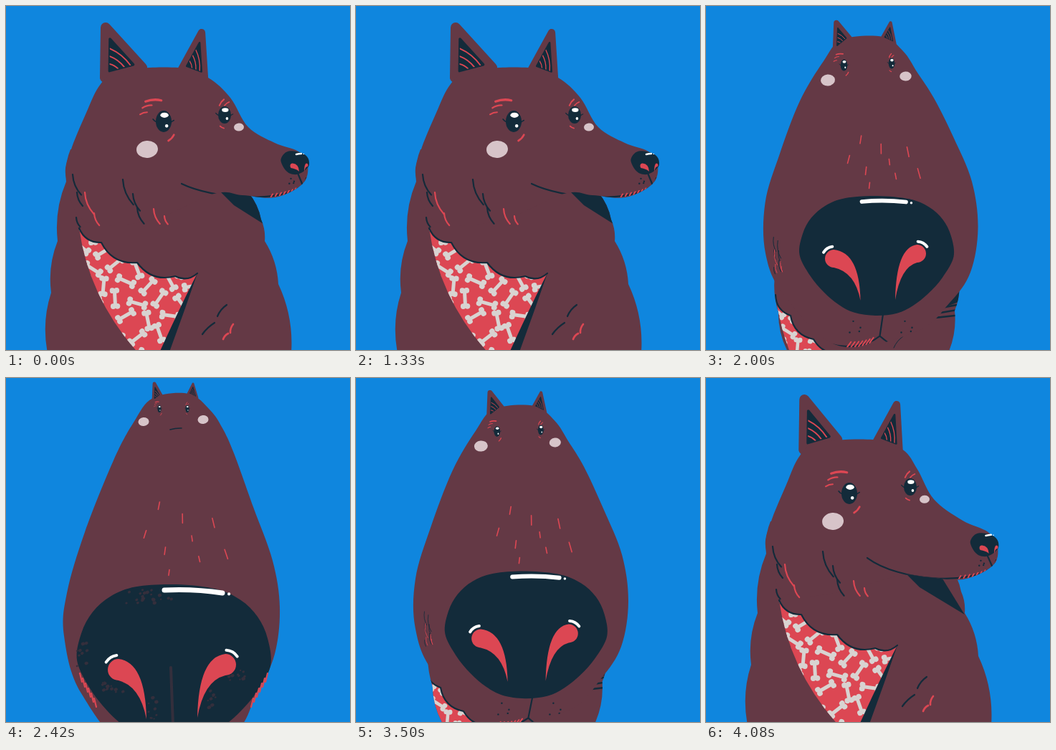
Recreate the animation shown at these times as an HTML page with a canvas. Size 480 by 480 pixels, loop 4160 ms.

```html
<!DOCTYPE html>
<html>
<head>
<meta charset="utf-8">
<style>
html, body { margin: 0; width: 100%; height: 100%; overflow: hidden; background: #0f86de; }
canvas { display: block; width: 480px; height: 480px; }
</style>
</head>
<body>
<canvas id="stage" width="480" height="480"></canvas>
<script>
const ctx = document.getElementById('stage').getContext('2d');
const BLUE = '#0f86de', FUR = '#643945', NAVY = '#132b3a', RED = '#dc4753',
  PINK = '#d7c4c9', BONE = '#d8d3d1', WHITE = '#fff', GRAIN = '#342f3c';
const LOOP = 4160, FRAMES = 50;

// Key points of a pose. Sizes: eyes x y rx ry, cheeks x y r, nose x y rx ry tilt,
// nostrils head tail r, shine line width, scarf bend tip scale,
// neck x y kx ky width, chest x y width, bridge x y rx ry length.
const SIDE = {
  head: [110,300, 84,240, 90,203, 112,149, 132,109, 160,90, 240,86, 282,100, 313,128,
    338,169, 375,191, 408,203, 421,222, 414,248, 376,267, 330,264, 290,262, 200,300],
  torso: [58,484, 63,400, 72,328, 84,245, 90,200, 338,260, 356,298, 361,328, 380,388, 398,484],
  ears: [[138,100, 139,30, 190,86], [245,88, 273,37, 277,100]],
  eyes: [[220,161,11,15], [305,152,9,12]],
  cheeks: [[197,200,15], [325,169,7]],
  nose: [403,219,20,16,.2],
  nostrils: [[400,223,409,231,3.5], [419,222,416,231,2.5]],
  shine: [405,207,412,206,2.5],
  mouth: [245,248, 290,270, 385,275, 414,250, 419,240],
  shadow: [298,258, 345,258, 378,316, 318,278],
  fur: [102,310, 133,330, 183,358, 236,377, 267,373],
  scarf: [116,410,188,488,1],
  neck: [90,235,1,1,2.2], chest: [308,417,2.2], bridge: [350,195,0,0,0], hair: 4
};
const TURN = {
  head: [80,290, 79,250, 92,205, 112,160, 146,98, 165,78, 240,73, 264,85, 283,115,
    299,149, 335,173, 360,212, 368,262, 355,312, 322,346, 262,368, 205,355, 147,307],
  torso: [70,484, 67,405, 73,340, 82,265, 93,205, 345,312, 377,350, 382,385, 380,405, 381,484],
  ears: [[152,92, 150,35, 184,74], [236,76, 254,34, 255,80]],
  eyes: [[178,137,10,13], [269,130,8,11]],
  cheeks: [[151,171,13], [286,153,8]],
  nose: [252,267,51,34,0],
  nostrils: [[227,271,250,294,8], [277,266,265,294,8]],
  shine: [240,242,263,240,4],
  mouth: [147,307, 170,345, 235,380, 261,347, 318,345],
  shadow: [240,368, 357,318, 386,388, 300,386],
  fur: [91,318, 120,350, 152,382, 190,404, 212,400],
  scarf: [104,410,150,490,.87],
  neck: [80,240,.5,1,2.2], chest: [286,435,2.2], bridge: [243,203,26,18,9], hair: 9
};
const CLOSE = {
  head: [85,330, 80,250, 95,200, 112,150, 150,92, 175,66, 238,64, 266,82, 288,116,
    318,152, 345,185, 370,235, 377,300, 363,358, 330,388, 275,410, 190,428, 112,365],
  torso: [80,484, 72,415, 76,345, 84,270, 95,200, 345,355, 371,366, 371,395, 364,430, 366,484],
  ears: [[155,90, 157,39, 184,66], [237,68, 254,39, 260,78]],
  eyes: [[171,122,7,11], [265,117,6,10]],
  cheeks: [[148,146,12.5], [282,138,9]],
  nose: [242,299,80,57,0],
  nostrils: [[200,298,235,346,10], [283,291,261,346,10]],
  shine: [214,250,256,247,4.5],
  mouth: [106,352, 122,420, 205,445, 253,391, 318,398],
  shadow: [200,428, 368,355, 374,405, 290,436],
  fur: [97,403, 118,432, 150,465, 190,484, 200,490],
  scarf: [103,450,120,490,.9],
  neck: [88,305,.12,.9,2], chest: [300,482,2], bridge: [240,207,50,22,14], hair: 9
};
const LENS = {
  ...CLOSE,
  head: [81,360, 85,300, 110,215, 150,115, 178,62, 205,28, 255,22, 285,45, 302,70,
    318,105, 345,180, 372,255, 382,320, 375,385, 350,440, 310,500, 180,520, 105,440],
  torso: [150,484, 130,440, 120,380, 120,300, 140,230, 300,300, 330,330, 335,370, 330,420, 310,484],
  ears: [[206,32, 207,8, 216,24], [254,22, 261,8, 267,28]],
  eyes: [[214,43,2.5,5], [253,43,2.5,5]],
  cheeks: [[192,61,7.5], [275,58,7.5]],
  nose: [234,398,135,110,.03],
  nostrils: [[157,407,196,476,15], [306,400,267,474,15]],
  shine: [221,296,302,300,7],
  mouth: [100,470, 140,520, 200,540, 232,530, 330,520],
  neck: [100,340,.05,.5,0], chest: [250,440,0], bridge: [243,220,68,58,13]
};

const clamp = v => Math.min(1, Math.max(0, v));
const smooth = v => (v = clamp(v), v * v * (3 - 2 * v));
const lerp = (a, b, u) => a + (b - a) * u;
const point = (a, b, u) => [lerp(a[0], b[0], u), lerp(a[1], b[1], u)];
const pairs = p => Array.from({ length: p.length >> 1 }, (_, i) => [p[2 * i], p[2 * i + 1]]);

// Turns the side pose: a moves the eyes, b the nose, h lowers the muzzle.
const TURNING = { head: 36, ears: 6, eyes: 2, cheeks: 2, nose: 2, nostrils: 4, shine: 4, mouth: 10, shadow: 8 };
function turned(a, b, h) {
  const move = (v, n) => {
    if (Array.isArray(v[0])) return v.map(w => move(w, n));
    const out = v.slice();
    for (let i = 0; i < n; i += 2) {
      const x = v[i], y = v[i + 1];
      out[i] += smooth((x - 110) / 90) * lerp(.35, 1, smooth((y - 95) / 45)) * lerp(a, b, smooth((x - 340) / 80));
      out[i + 1] += h * smooth((x - 230) / 50) * smooth((y - 165) / 50);
    }
    return out;
  };
  const pose = { ...SIDE };
  for (const key in TURNING) pose[key] = move(SIDE[key], TURNING[key]);
  return pose;
}
const AWAY = turned(24, 47, -8), BACK = turned(-20, -14, 14);

const KEYS = [[0, SIDE], [2, AWAY], [14, AWAY], [16, SIDE], [20, TURN], [22, CLOSE],
  [26, LENS], [40, LENS], [45, CLOSE], [49, BACK], [50, SIDE]];

function blend(a, b, u) {
  if (typeof a === 'number') return lerp(a, b, u);
  if (Array.isArray(a)) return a.map((v, i) => blend(v, b[i], u));
  return Object.fromEntries(Object.keys(a).map(k => [k, blend(a[k], b[k], u)]));
}

function fill(path, color) {
  ctx.fillStyle = color;
  ctx.fill(path);
}
function stroke(path, w, color) {
  if (w < .15) return;
  ctx.lineWidth = w;
  ctx.strokeStyle = color;
  ctx.stroke(path);
}
// A brush mark from a to b, bent sideways by a share of its length.
function mark(a, b, bend, w, color) {
  const path = new Path2D();
  path.moveTo(...a);
  path.quadraticCurveTo((a[0] + b[0]) / 2 + (b[1] - a[1]) * bend, (a[1] + b[1]) / 2 - (b[0] - a[0]) * bend, ...b);
  stroke(path, w, color);
}
function oval(x, y, rx, ry, color, rot = 0) {
  const path = new Path2D();
  path.ellipse(x, y, rx, ry, rot, 0, 7);
  fill(path, color);
}
function clipped(path, paint) {
  ctx.save();
  ctx.clip(path);
  paint();
  ctx.restore();
}

function rounded(flat) {
  const p = pairs(flat), n = p.length, path = new Path2D();
  path.moveTo(...p[0]);
  for (let i = 0; i < n; i++) {
    const [a, b, c, d] = [i + n - 1, i, i + 1, i + 2].map(k => p[k % n]);
    path.bezierCurveTo(b[0] + (c[0] - a[0]) / 6, b[1] + (c[1] - a[1]) / 6,
      c[0] - (d[0] - b[0]) / 6, c[1] - (d[1] - b[1]) / 6, ...c);
  }
  return path;
}
// Tufts of fur: an arc between each two points.
function tufted(flat, bulge) {
  const p = pairs(flat), path = new Path2D();
  path.moveTo(...p[0]);
  for (let i = 1; i < p.length; i++) {
    const [a, b] = [p[i - 1], p[i]];
    path.quadraticCurveTo((a[0] + b[0]) / 2 + (b[1] - a[1]) * bulge, (a[1] + b[1]) / 2 - (b[0] - a[0]) * bulge, ...b);
  }
  return path;
}
function polygon(points) {
  const path = new Path2D();
  points.forEach(p => path.lineTo(...p));
  path.closePath();
  return path;
}

function drawBone(x, y, rot) {
  ctx.save();
  ctx.translate(x, y);
  ctx.rotate(rot);
  mark([-9, 0], [9, 0], 0, 5, BONE);
  for (const sx of [-11, 11]) for (const sy of [-3, 3]) oval(sx, sy, 3.9, 3.7, BONE);
  ctx.restore();
}

function drawScarf({ fur, scarf }) {
  const [bx, by, tx, ty, k] = scarf, [x0, y0] = fur, [x1, y1] = fur.slice(-2);
  const edge = tufted(fur, -.34), cloth = new Path2D(edge);
  cloth.lineTo(tx + 27, ty);
  cloth.lineTo(tx, ty);
  cloth.quadraticCurveTo(bx, by, x0, y0);
  fill(cloth, RED);
  clipped(cloth, () => {
    ctx.translate(x0, y0);
    ctx.scale(k, k);
    for (let row = 0; row < 8; row++)
      for (let col = 0; col < 7; col++)
        drawBone(col * 31 + row % 2 * 15 - 12, row * 24 + col % 2 * 7 + 2, col * 1.9 + row * 1.1 - .4);
  });
  const shade = new Path2D();
  shade.moveTo(x1, y1);
  shade.quadraticCurveTo(lerp(x1, tx, .3), lerp(y1, ty, .4), tx + 24, ty);
  shade.lineTo(tx + 38, ty);
  shade.quadraticCurveTo(lerp(x1, tx, .25), lerp(y1, ty, .5), x1, y1);
  fill(shade, NAVY);
  stroke(edge, 2.2, NAVY);
}

function drawChest({ shadow, chest, hair }) {
  const [a, b, c, d] = pairs(shadow);
  fill(polygon([a, b, c, d]), NAVY);
  for (let i = 1; i < 4; i++)
    mark(point(a, d, .3 * i), [c[0] - 9 * i, c[1] + 9 * i], -.05, (hair - 4) / 2, NAVY);
  const [x, y, w] = chest;
  mark([x, y], [x - 13, y + 16], -.15, w, NAVY);
  mark([x - 17, y + 25], [x - 34, y + 41], -.1, w, NAVY);
  mark([x + 9, y + 27], [x + 5, y + 39], -.2, w * 1.2, RED);
  mark([x + 2, y + 40], [x - 5, y + 48], -.2, w * 1.2, RED);
}

const NECK = [[3, 0, 30], [9, 25, 20], [73, 7, 37], [87, 27, 25], [93, 46, 24], [8, 60, 14],
  [20, 25, 32, RED], [33, 54, 18, RED], [116, 48, 22, RED], [131, 58, 12, RED]];
function drawNeck({ neck: [x, y, kx, ky, w] }) {
  for (const [dx, dy, len, color = NAVY] of NECK) {
    const a = [x + dx * kx, y + dy * ky];
    mark(a, [a[0] + len * .4 * Math.sqrt(kx), a[1] + len * ky * .95], -.18, w, color);
  }
}

const earSize = p => Math.abs(p[1] - p[3]) * .2;
function drawEar(p) {
  const path = polygon(pairs(p));
  fill(path, FUR);
  stroke(path, earSize(p), FUR);
}
function drawInnerEar(p) {
  const pts = pairs(p), mid = [(p[0] + p[2] + p[4]) / 3, (p[1] + p[3] + p[5]) / 3 + earSize(p) * .15];
  const [left, tip, right] = pts.map(q => point(mid, q, .64));
  const path = polygon([left, tip, right]);
  fill(path, NAVY);
  stroke(path, earSize(p) * .25, NAVY);
  clipped(path, () => {
    for (let i = 0; i < 3; i++)
      mark(point(tip, left, .3 + .24 * i), point(right, left, .12 + .26 * i), .14, earSize(p) * .13, RED);
  });
}

function drawEye([x, y, rx, ry], i) {
  const at = (u, v) => [x + u * rx, y + v * ry];
  const tick = (a, b, c, d, w, color, bend = .15) => mark(at(a, b), at(c, d), bend, ry * w, color);
  oval(x, y, rx, ry, NAVY);
  tick(-.8, .1, -1.35, -.2, .12, NAVY);
  tick(.8, .2, 1.3, -.1, .1, NAVY);
  oval(...at(.1, -.58), rx * .52, ry * .24, WHITE);
  oval(...at(.38, .42), rx * .2, ry * .16, WHITE);
  if (i) {
    tick(-.8, -1.1, -.1, -1.8, .17, RED);
    tick(0, -1.1, .7, -1.5, .15, RED);
    tick(-.7, 1.3, -.1, 1.55, .15, RED, -.15);
  } else {
    tick(-2.3, -1.85, -.3, -1.95, .22, RED);
    tick(-2.7, -1.25, -1.5, -1.5, .15, RED);
    tick(-3, -.65, -2.1, -.85, .14, RED);
    tick(.6, 1.8, 1.3, 1.25, .18, RED, -.15);
  }
}

function drawMouth({ mouth, nose, hair }) {
  const [a, b, c, m, r] = pairs(mouth);
  const bend = [(m[0] + r[0]) / 2, Math.max(m[1], r[1]) + .45 * Math.abs(r[0] - m[0])];
  const path = new Path2D();
  path.moveTo(...a);
  path.bezierCurveTo(...b, ...c, ...m);
  path.quadraticCurveTo(...bend, ...r);
  path.moveTo(nose[0] + hair, nose[1] + nose[3] - 2);
  path.lineTo(...m);
  stroke(path, 2.2, NAVY);

  const quad = (p, q, s, u) => point(point(p, q, u), point(q, s, u), u);
  const left = u => point(quad(a, b, c, u), quad(b, c, m, u), u);
  const right = u => quad(m, bend, r, u);
  const bristle = ([x, y], lean) => mark([x, y + 1], [x + lean * hair, y - hair * .7], 0, 1.9, RED);
  for (let i = 0; i < 7; i++) {
    bristle(left(.68 + .035 * i), .6);
    bristle(right(.3 + .1 * i), .5);
  }
  for (const side of [-1, 1])
    for (let i = 0; i < 4; i++)
      oval(m[0] + side * hair * 4 + hair * Math.cos(i * 2.3), m[1] - hair * 1.3 + hair * Math.sin(i * 2.3), 1.2, 1.2, NAVY);
}

// Ticks spread evenly over the bridge of the muzzle.
function drawBridge({ bridge: [x, y, rx, ry, len] }) {
  for (let i = 0; i < 9; i++) {
    const r = Math.sqrt((i + .5) / 9), px = x + rx * r * Math.cos(i * 2.4), py = y + ry * r * Math.sin(i * 2.4);
    mark([px, py], [px + (px - x) * .07, py + len * (.6 + i % 3 * .2)], 0, len && 1.6, RED);
  }
}

let seed = 7;
const random = () => (seed = seed * 16807 % 2147483647) / 2147483647;
const grain = [[202, 304, 34, 12], [106, 384, 8, 18], [205, 462, 6, 16], [322, 408, 12, 16], [286, 446, 7, 14], [150, 431, 16, 8]]
  .flatMap(([x, y, w, h]) => Array.from({ length: 6 + w / 2 }, () =>
    [x + (random() * 2 - 1) * w, y + (random() * 2 - 1) * h, 1 + random() * 1.4]));

function drawNose({ nose: [x, y, rx, ry, tilt], nostrils, shine }, lens) {
  const flat = [];
  for (let i = 0; i < 20; i++) {
    const a = i / 20 * Math.PI * 2, c = Math.cos(a), s = Math.sin(a);
    const u = Math.sign(c) * Math.abs(c) ** .75 * rx * (1 - .35 * Math.max(0, s));
    const v = Math.sign(s) * Math.abs(s) ** .9 * ry;
    flat.push(x + u * Math.cos(tilt) - v * Math.sin(tilt), y + u * Math.sin(tilt) + v * Math.cos(tilt));
  }
  fill(rounded(flat), NAVY);

  ctx.globalAlpha = lens;
  grain.forEach(([gx, gy, r]) => oval(gx, gy, r * 1.2, r, GRAIN, -.4));
  mark([230, 404], [233, 484], 0, 4, GRAIN);
  for (let i = 0; i < 6; i++)
    for (const side of [-1, 1]) {
      const px = 234 + side * (128 - 4 * i), py = 424 + 7 * i;
      mark([px, py], [px + 3 * side, py - 12], 0, 2.2, RED);
    }
  ctx.globalAlpha = 1;

  nostrils.forEach(([hx, hy, tx, ty, r], i) => {
    const drop = new Path2D(), out = i ? 1 : -1;
    drop.moveTo(hx, hy - r);
    drop.quadraticCurveTo(tx + out * r * .1, hy - r * .7, tx, ty);
    drop.quadraticCurveTo(tx + out * r * .6, hy + r * 1.5, hx, hy + r);
    drop.arc(hx, hy, r, Math.PI / 2, -Math.PI / 2, !!i);
    fill(drop, RED);
    const glint = new Path2D(), a = i ? -1.5 : -2.6;
    glint.arc(hx, hy, r * 1.35, a, a + .9);
    stroke(glint, 4 * clamp((rx - 51) / 25), WHITE);
  });
  const [x0, y0, x1, y1, w] = shine;
  mark([x0, y0], [x1, y1], .05, w, WHITE);
  oval(x1 + w * 1.3, y1 + w * .2, w * .3, w * .3, WHITE);
}

function drawHeart(x, y, s) {
  const path = new Path2D();
  path.moveTo(x, y + s);
  path.bezierCurveTo(x - s * 2, y - s * .3, x - s * .7, y - s * 1.4, x, y - s * .3);
  path.bezierCurveTo(x + s * .7, y - s * 1.4, x + s * 2, y - s * .3, x, y + s);
  fill(path, RED);
}

function draw(n) {
  const k = KEYS.findIndex(([end]) => end > n);
  const [start, from] = KEYS[k - 1], [end, to] = KEYS[k];
  const u = (n - start) / (end - start), pose = blend(from, to, u);
  const lens = clamp(((from === LENS ? 1 - u : 0) + (to === LENS ? u : 0) - .7) / .3);

  ctx.fillStyle = BLUE;
  ctx.fillRect(0, 0, 480, 480);
  ctx.lineCap = ctx.lineJoin = 'round';
  ctx.save();
  if (from === to) {
    const breath = (1 - Math.cos((n - (from === LENS ? 29 : 0)) * Math.PI / 4)) / 2;
    ctx.translate(235, 480);
    ctx.scale(1 + .012 * breath, 1 - .003 * breath);
    ctx.translate(-235, -480);
  }

  const torso = tufted(pose.torso, .13), head = rounded(pose.head);
  fill(torso, FUR);
  clipped(torso, () => {
    drawScarf(pose);
    drawChest(pose);
  });
  pose.ears.forEach(drawEar);
  fill(head, FUR);
  pose.ears.forEach(drawInnerEar);
  drawNeck(pose);
  clipped(head, () => {
    pose.cheeks.forEach(([x, y, r]) => oval(x, y, r, r * .8, PINK, -.08));
    pose.eyes.forEach(drawEye);
    drawBridge(pose);
    drawMouth(pose);
    mark([229, 72], [245, 70], .08, 1.6 * lens, NAVY);
  });
  drawNose(pose, lens);
  ctx.restore();

  if (n >= 32 && n < 40) {
    const bob = n % 4 === 1 ? 0 : .6;
    drawHeart(283, 10 - bob, 2.2);
    drawHeart(280, 17 + bob, 2.6);
  }
}

const t0 = performance.now();
function tick() {
  const t = (performance.now() - t0) % LOOP;
  draw(Math.floor((t + 2) / (LOOP / FRAMES)) % FRAMES);
  requestAnimationFrame(tick);
}
tick();
</script>
</body>
</html>
```
